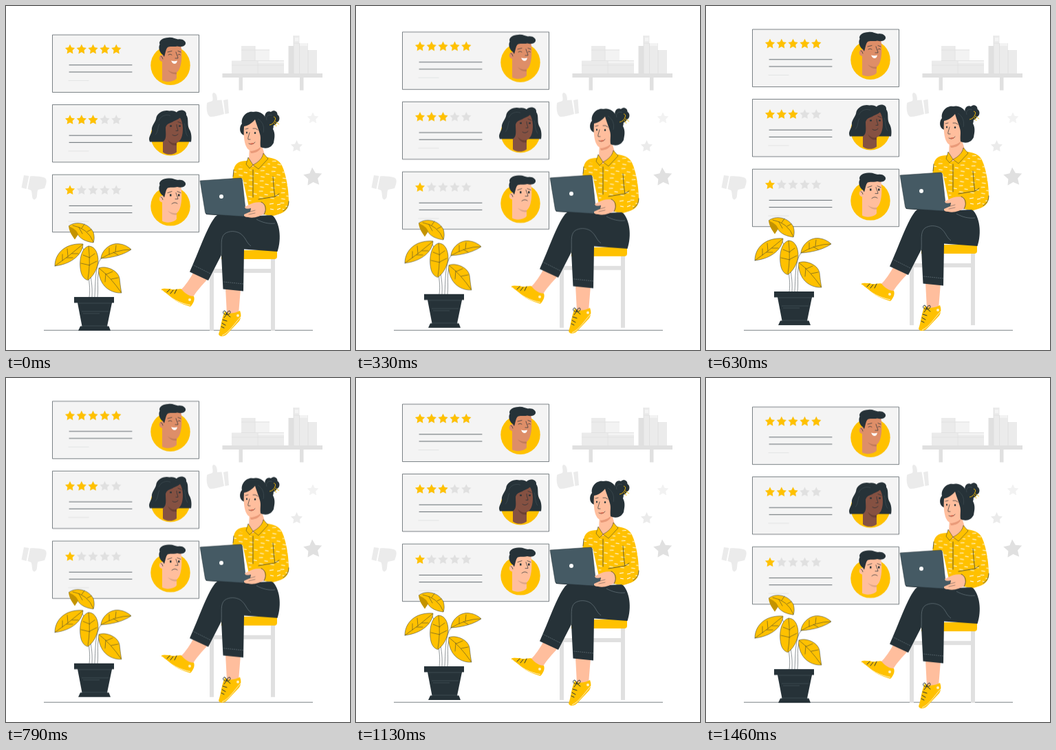
An HTML page without scripts for the animation above (1.5 s loop, 500 by 500 pixels).

```html
<!DOCTYPE html>
<html lang="en">
<head>
<meta charset="utf-8">
<title>Customer reviews</title>
<style>
  html, body { margin: 0; height: 100%; overflow: hidden; background: #fff; }
  svg { display: block; width: 100vw; height: 100vh; }
  .float { animation: float 1.5s -30ms infinite linear; }
  @keyframes float {
    0%, 100% { transform: translateY(.3px); }
    50% { transform: translateY(-9.2px); }
  }
  .dark { fill: #263238; }
  .gold { fill: #ffc100; }
  .grey { fill: #e0e0e0; }
  .pale { fill: #ebebeb; }
  .skin { fill: #ffbe9d; }
  .line { fill: none; stroke: #263238; stroke-width: .7; stroke-linecap: round; stroke-linejoin: round; }
  .thin { stroke-width: .5; }
  .seam { fill: none; stroke: #75838a; stroke-width: .6; }
  .leaf { fill: #ffc100; stroke: #263238; stroke-width: .5; }
</style>
</head>
<body>
<svg viewBox="0 0 500 500">
  <defs>
    <path id="star" d="M0-7.4 2.2-2.9 7.1-2.2 3.6 1.3 4.4 6.2 0 3.9-4.4 6.2-3.6 1.3-7.1-2.2-2.2-2.9Z"/>
    <path id="card" d="M67.5 42H280.5V125.5H67.5Z" fill="#f4f4f4" stroke="#263238" stroke-width=".6"/>
    <g id="content">
      <path class="line" d="M92 85.8H183M92 96H183"/>
      <path class="line" d="M91 108.5H120" opacity=".12"/>
      <circle class="gold" cx="239" cy="86.3" r="28.7"/>
      <g class="grey">
        <use href="#star" x="109.8" y="63.2"/>
        <use href="#star" x="126.5" y="63.2"/>
        <use href="#star" x="143.5" y="63.2"/>
        <use href="#star" x="160.3" y="63.2"/>
      </g>
      <use href="#star" class="gold" x="93" y="63.2"/>
    </g>
    <g id="man">
      <path fill="currentColor" d="M229 69C229 61 233 56 240 55L254 56C256 67 256 80 253 89C251 95 248 96.500 248 97V105C245 110 233 112 227 108V81C221 80 221 70 229 71Z"/>
      <path d="M235 93C239 96 244 97 248 96.500V99C243 100 238 97 235 93Z" opacity=".13"/>
      <path class="dark" d="M228 71C223 68 221 60 223.500 56C221 50 229 46 236 46C242 45 246 48 250 48.500C256 47 262 51 261 55C260 59 254 60 249 58.500C244 60 239 58 235 60C232 63 232 68 230 74Z"/>
      <path class="line" d="M247 67C248 71 250 74 250 76H246M225 73Q228 74 228 77"/>
    </g>
    <pattern id="dashes" width="16" height="15" patternUnits="userSpaceOnUse" patternTransform="rotate(4)">
      <path d="M2 3 7 2.500M10 7 14.500 7.500M3 11.500 8 12" stroke="#fff" stroke-width="1.1" stroke-linecap="round"/>
    </pattern>
  </defs>

  <!-- room -->
  <path class="grey" d="M314.500 98H460V104H432.500V122.500H427V104H344V122.500H338.500V104H314.500Z"/>
  <path class="pale" d="M342 58H362V63H383V79.500H404V98H328V79.500H342Z"/>
  <path fill="#f3f3f3" d="M362 63H383V79.500H362ZM366 80H404V83H366Z"/>
  <path fill="none" stroke="#e0e0e0" stroke-width=".8" d="M342 79.500H404M362 58V79M342 64H383M366 80V98M328 86H404"/>
  <path class="grey" d="M410.500 58H418V98H410.500Z"/>
  <path class="pale" d="M418 43H426.500V54H439V64H452V98H418Z"/>
  <path fill="#f3f3f3" d="M420 46H425V51H420ZM427 54H438V58H427Z"/>
  <path fill="none" stroke="#dedede" stroke-width=".8" d="M418 43V98M426.500 54V98M439 64V98M418 54H426"/>
  <g class="pale">
    <path d="M292 142Q292 140 294 140L300 138C302 134 298 128 301.500 126C306 126 307 132 307 137L313.500 136.500 317 157C310 159 303 161 297 161C292 159 291 149 292 142ZM316 137 322.500 135.500 324 156 318.500 157Z"/>
    <path d="M26 246 33.500 247 29.500 266 22.500 264ZM35 247.500C43 247 50 248 56 249.500C61 252 58 260 56 265L46.500 267C44 272 47 279 41.500 281.500C36.500 281 39 274 36.500 268L31.500 266Z"/>
    <use href="#star" transform="translate(422.500 204) scale(1.2)"/>
  </g>
  <use href="#star" fill="#f2f2f2" transform="translate(446 163) scale(1.16)"/>
  <use href="#star" class="grey" transform="translate(446 248.500) rotate(-4) scale(1.9)"/>
  <path d="M55 471.300H446" stroke="#263238" stroke-width=".6"/>

  <g class="float">
    <!-- reviews -->
    <use href="#card"/>
    <use href="#card" y="101.500"/>
    <use href="#card" y="203.200"/>
    <g>
      <use href="#content"/>
      <g class="gold">
        <use href="#star" x="109.800" y="63.200"/>
        <use href="#star" x="126.500" y="63.200"/>
        <use href="#star" x="143.500" y="63.200"/>
        <use href="#star" x="160.300" y="63.200"/>
      </g>
      <use href="#man" color="#de8e68"/>
      <path fill="#fff" d="M240 79.500Q245 81 249 79.500Q248 84 245 84Q242 84 240 79.500Z"/>
      <path class="line" d="M236 71Q238.500 69 241 71M250 71Q252 69 253.500 71M235 67 241 65.500M250 65.500 254 67"/>
    </g>
    <g transform="translate(0 102.400)">
      <use href="#content"/>
      <g class="gold">
        <use href="#star" x="109.800" y="63.200"/>
        <use href="#star" x="126.500" y="63.200"/>
      </g>
      <path class="dark" d="M209 95C206 88 211 85 212 79C211 72 216 68 218 62C219 52 230 48 238 50C243 49 246 51 248 52C253 47 263 49 262 56C266 61 263 69 266 76C270 82 270 90 269 95Z"/>
      <path fill="#855142" d="M232 74C234 66 246 66 253 60C258 67 258 82 255 89C253 94 249 96 248 97V110C242 115 233 114 228 110V95C234 91 232 84 232 74Z"/>
      <path d="M235 92C239 96 244 98 248 96.500V100C242 101 238 98 235 92Z" opacity=".2"/>
      <path class="line" d="M248 70C248 74 250 77 250 79H247M236 68 242 66M250 66 255 68M242 85Q246 88 250 84"/>
      <path class="dark" d="M238 71h3v2h-3zM251 71h3v2h-3z"/>
      <path class="seam" d="M222 64C226 56 233 55 239 57M217 85C222 79 220 74 223 69M264 87C260 82 261 73 259 68" opacity=".4"/>
    </g>
    <g transform="translate(0 204.600)">
      <use href="#content"/>
      <use href="#man" color="#ffbe9d"/>
      <path class="dark" d="M238 69h2.500v3h-2.500zM250 69h2.500v3h-2.500z"/>
      <path class="line" d="M235 67 241 65M249 65 254 67M241 83Q245 79.500 249 82.500"/>
    </g>

    <!-- plant -->
    <path class="line thin" d="M121 423C123 410 120 400 120 388M125 423C126 405 123 395 122 388M129 423C130 405 129 378 138 367M133 423C135 405 131 395 136 383M120 391C121 373 116 358 110 349"/>
    <path class="leaf" d="M71 378C71 359 87 344 112 346C111 361 96 375 71 378Z"/>
    <path class="leaf" d="M91 320C101 312 120 315 127 329C129 336 128 341 127 344C118 343 107 339 104 331Z"/>
    <path fill="#c39300" d="M91 320C98 323 103 326 105 332L100 339.500C97 335 92 329 91 320Z"/>
    <path class="leaf" d="M138 367C139 355 152 343 166 346C174 347 180 352 182 354C172 361 156 366 138 367Z"/>
    <path class="leaf" d="M135 381C145 377 163 384 165 396C166 405 167 413 168 417C156 418 143 411 138 399C135 392 134 385 135 381Z"/>
    <path class="leaf" d="M121 349C110 350 105 370 109 387C111 395 116 398 119 398.500C127 393 133 382 134 371C134 360 130 350 121 349Z"/>
    <path class="line thin" d="M71 378Q90 365 111 347M82 370V361M90 364 89 353M88 366H97M96 360H105M97 319Q119 323 127 343M110 323 114 317M118 328 124 325M106 322 111 331M138 367Q160 354 181 354M150 361V352M159 357 160 348M156 358 163 362M135 381Q152 394 167 416M146 390 155 386M153 397 163 395M145 389 144 401M120 349Q123 375 119 397M122 365 129 360M122 376 132 371M122 366 112 362M122 377 109 374"/>
    <path class="dark" d="M99 423H157V431.500H154L147 465.500H149.500L152 472H105L108 465.500H110.500L104 431.500H99Z"/>
    <path class="seam" d="M104 432H153M110 444H149M112 447H136M109 465H149" opacity=".5"/>

    <!-- chair -->
    <path class="grey" d="M296 366H302V382H385V366H391V472H385V388H302V472H296Z"/>
    <path class="gold" d="M313 355H394V364Q394 368 390 368H313Z"/>

    <!-- legs -->
    <path class="skin" d="M273 386 293 397C284 407 276 415 269 428L253 414C261 406 268 396 273 386ZM319 409 341 411 338 448H321Z"/>
    <path class="gold" d="M226 411.500C229 410 234 411 238 411C245 414 250 410 255 411.500C259 417 266 422 273 422C275 427 272 433 268 437C255 433 245 429 237 421C232 416 225 414 226 411.500Z"/>
    <path class="gold" d="M318 444C324 449 335 446 340 443C342 448 342 453 339 458L323 475C318 481 311 482 309 477C312 470 313 455 318 444Z"/>
    <path fill="none" stroke="#fff" stroke-width=".8" d="M227 413C240 426 253 432 268 435M341 452C332 462 324 475 314 479"/>
    <circle cx="267" cy="427" r="2" fill="#fff3c9"/>
    <circle cx="337" cy="450" r="2" fill="#fff3c9"/>
    <path class="line" style="stroke-width:1" d="M238 412 234 416M243 413 239 418M248 412 245 418M315 456 321 458M314 461 319 464M313 466 317 468M321 448C315 450 314 443 318 443Q320 444 321 448C324 450 328 445 325 443Q322 443 321 448L317 453M321 448 326 452"/>
    <path class="dark" d="M387 304C398 314 401 338 394.500 357L346 353.500 345 414.500 315.500 411.500 313 362 294 399 267 386.500C280 358 292 322 303 308C311 297 330 299 346 306Z"/>
    <path class="seam" d="M313 362C314 348 311 337 318 331C325 326 335 327 341 331C349 337 349 344 356 349M364 310C373 315 382 317 391 316"/>
    <path class="seam" stroke-dasharray="2 1" d="M271 376 297 389M316 401 345 404"/>

    <!-- shirt -->
    <path class="gold" d="M350 225C340 225 333 228 331 238L329 254 344 251 353 292 388 305C402 302 412 297 411 284C411 265 406 240 400 230C395 222 386 221 376 219Z"/>
    <path fill="url(#dashes)" d="M350 236C340 229 333 230 331 238L329 254 344 251 353 284 376 282 384 300C402 302 412 297 411 284C411 265 406 240 400 230C395 222 386 223 381 229L361 240Z"/>
    <path class="line" d="M388 248C389 257 389 268 391 277L367 281M391 277 397 273M359 238V278M411 284C411 297 400 302 379 304M331 238 330 248"/>
    <path class="skin" d="M354 203 371 200 376 216C374 225 363 232 358 234L353 223Z"/>
    <path d="M355 211Q364 211 369 203L370 207C367 212 361 214 356 214Z" fill="#e99a79"/>
    <path class="leaf" d="M352 220 349 230 354 236 359 231ZM374 214 381 222 367 237 359 231C367 227 373 221 374 214Z"/>

    <!-- laptop and hand -->
    <path class="dark" d="M290 301 356 294 357 298 345 307 291 303Z"/>
    <path fill="#455a64" stroke="#263238" stroke-width=".5" d="M282 254 341 250Q343 250 343.500 253L348 295 355 293.500 356 298 345 306 292 302.500Q290 302 289.500 300Z"/>
    <circle cx="313" cy="277" r="3" fill="#fff"/>
    <path class="skin" d="M375 286C365 284 359 286 353 289L347 292Q348 296 356 294L355 299 346 303Q345 307 352 307C360 309 369 306 378 301Z"/>
    <path class="line" d="M355 299 362 297M353 303 362 301" stroke-opacity=".6"/>
    <path class="gold" d="M371 285C378 288 379 296 375 303C385 306 397 302 403 299L397 282Z"/>
    <path class="line" d="M371 285C378 288 379 296 375 303"/>
    <path d="M383 288 389 287M394 289 399 288M384 295 389 296M394 296 399 294" stroke="#fff" stroke-width="1.100"/>

    <!-- head -->
    <path class="dark" d="M377 165C374 157 380 151 385 154C390 150 395 154 394.500 158C399 160 398 168 394 169C391 176 382 175 379 171Z"/>
    <path class="dark" d="M344 187C339 184 339 175 343 171C341 162 350 152 359 154C367 152 374 156 377 162C386 164 391 172 388 179C392 186 390 193 389 199C385 207 377 209 368 204L356 192Z"/>
    <path class="skin" d="M346 175C352 174 358 170 362 165C364 172 367 179 369 186C371 192 369 197 370 205C366 209 357 212 353 209C346 204 345 188 346 175Z"/>
    <path class="line" d="M354 184C353 189 351 192 352 194H355M348 179 352 178M359 178Q363 177 366 180M353 200Q358 203 362 198"/>
    <path d="M354 200Q358 199 361 199Q358 203 354 200Z" fill="#d2674d"/>
    <ellipse class="dark" cx="350" cy="184" rx="1" ry="1.500"/>
    <ellipse class="dark" cx="362" cy="184.500" rx="1.200" ry="1.600"/>
    <path class="seam" d="M366 164C373 168 376 176 374 184M379 166C377 160 382 157 387 159" opacity=".4"/>
    <path d="M383 173Q389 172 391 166Q393 162 389 161M391 168 397 172M390 170 393 175" fill="none" stroke="#ffc100" stroke-width=".9"/>
  </g>
</svg>
</body>
</html>
```
